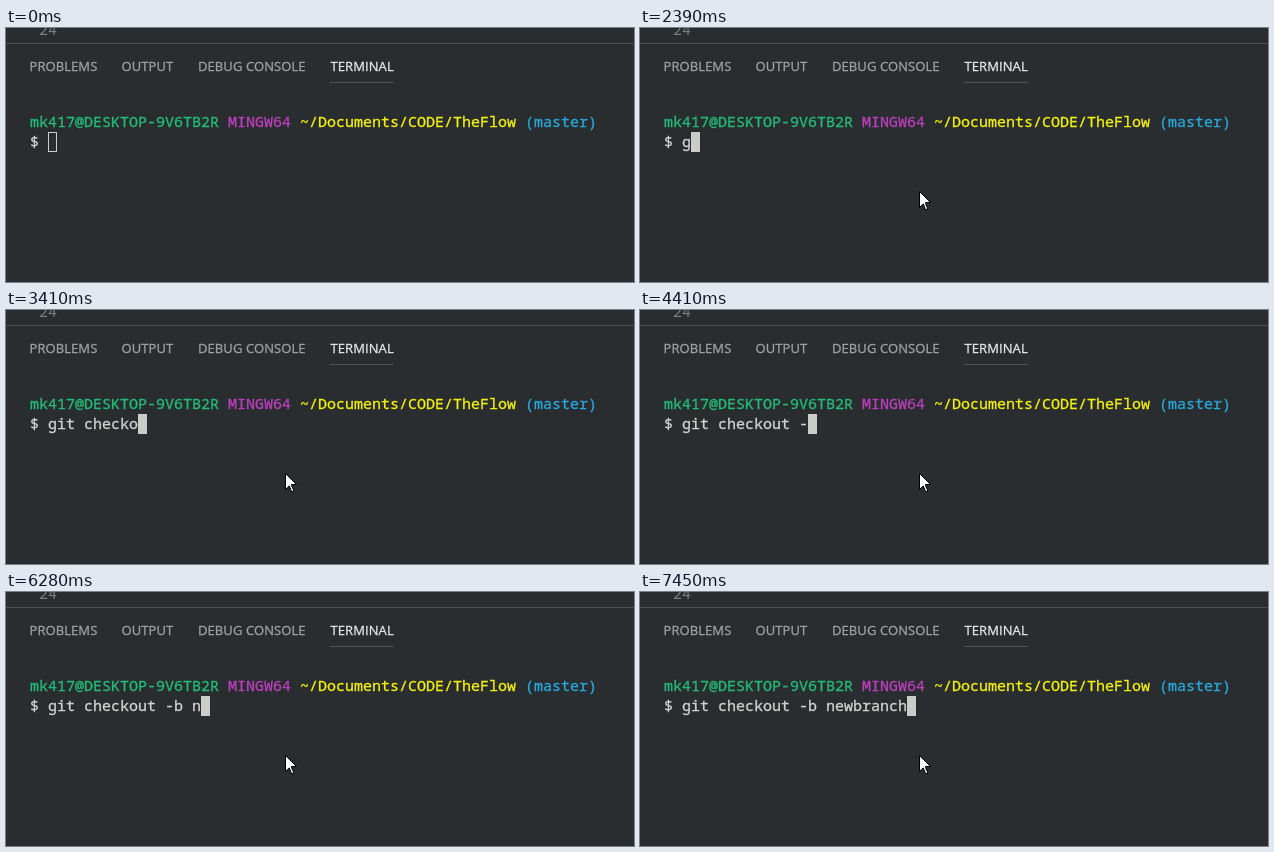
Animation of 628x254 px, one loop 8 s. Source, as an HTML page:

```html
<!DOCTYPE html>
<html lang="en">
<head>
<meta charset="utf-8">
<title>Terminal</title>
<style>
  html, body { margin: 0; width: 100%; height: 100%; overflow: hidden; background: #292d30; }
  svg { display: block; }
  text { white-space: pre; }
  text, tspan { fill: currentColor; stroke: currentColor; stroke-width: .3px; }
  .tabs { font: 13px "Open Sans", sans-serif; letter-spacing: .08px; color: #a0a2a3; }
  .tabs .active { color: #e7e7e7; }
  .mono { font: 15px "Noto Sans Mono", monospace; color: #d4d4d0; }
  .line-number { color: #7c7f81; stroke: none; }
  .user { color: #23bd78; }
  .system { color: #bc3fbc; }
  .path { color: #f5f210; }
  .branch { color: #29a9dc; }
</style>
</head>
<body>
<svg width="628" height="254" viewBox="0 0 628 254">
  <g class="mono"><text class="line-number" x="33" y="7">24</text></g>
  <rect y="15" width="628" height="1" fill="#4b5053"/>
  <g class="tabs">
    <text x="23.5" y="43">PROBLEMS</text>
    <text x="115.5" y="43">OUTPUT</text>
    <text x="192" y="43">DEBUG CONSOLE</text>
    <text x="324.5" y="43" class="active">TERMINAL</text>
  </g>
  <rect x="324" y="54" width="64" height="1" fill="#4f5356"/>
  <g class="mono">
    <text x="24" y="99"><tspan class="user">mk417@DESKTOP-9V6TB2R</tspan> <tspan class="system">MINGW64</tspan> <tspan class="path">~/Documents/CODE/TheFlow</tspan> <tspan class="branch">(master)</tspan></text>
    <text x="24" y="119">$ <tspan id="command"></tspan></text>
  </g>
  <rect id="caret" y="104.5" width="8" height="19" stroke="#ccccc8"/>
  <path id="pointer" d="M.5 .5V16.5L4.3 12.9L6.5 18.5H8.5V17L6.5 12.5V11.5H11.5Z" fill="#fff" stroke="#000"/>
  <circle id="click" cx="279" cy="163" r="15" fill="#ff0" fill-opacity=".47"/>
</svg>
<script>
const DURATION = 8000, CHAR_WIDTH = 9, COMMAND_X = 42;
const COMMAND = "git checkout -b newbranch";
// When each character of the command appears, in ms
const KEY_TIMES = [
  2390, 2560, 2560, 2710, 2800, 2880, 3030, 3180, 3180, 3410, 3490, 3640, 3800,
  4410, 5040, 5100, 6280, 6430, 6430, 6980, 7060, 7140, 7220, 7390, 7450
];
const MOVE_START = 130, MOVE_STEP = 80, MOVE_STEPS = 3;
const CLICK_START = 690, CLICK_END = 840;

const [command, caret, pointer, click] =
  ["command", "caret", "pointer", "click"].map(id => document.getElementById(id));
const show = (element, visible) =>
  element.setAttribute("visibility", visible ? "visible" : "hidden");

function draw() {
  const t = performance.now() % DURATION;

  const typed = KEY_TIMES.filter(time => time <= t).length;
  command.textContent = COMMAND.slice(0, typed);
  caret.setAttribute("x", COMMAND_X + typed * CHAR_WIDTH + 0.5);
  caret.setAttribute("fill", t < CLICK_START ? "none" : "#ccccc8");

  // The pointer arrives in a few discrete steps, slowing down
  const step = Math.min(MOVE_STEPS, Math.floor((t - MOVE_START) / MOVE_STEP));
  const left = (1 - step / MOVE_STEPS) ** 1.6;
  show(pointer, step >= 0);
  if (step >= 0) {
    pointer.setAttribute("transform",
      `translate(${Math.round(279 + 134 * left)} ${Math.round(163 + 58 * left)})`);
  }
  show(click, t >= CLICK_START && t < CLICK_END);

  requestAnimationFrame(draw);
}
draw();
</script>
</body>
</html>
```
